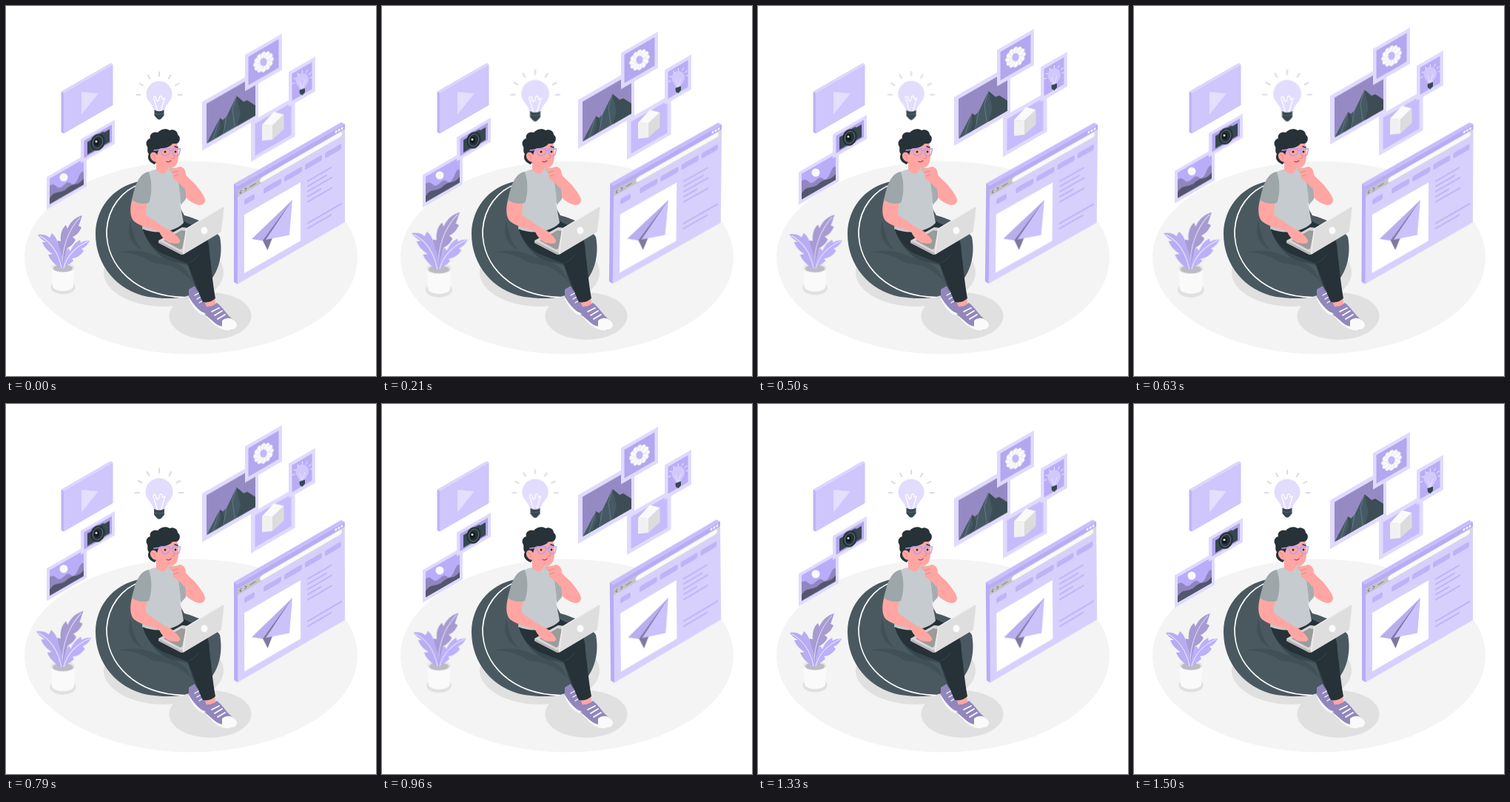
Animation of 500 by 500 pixels, one loop 1.54 s. Source, as an HTML page:

```html
<!DOCTYPE html>
<html lang="en">
<head>
<meta charset="utf-8">
<title>Creative thinking</title>
<style>
html, body { margin: 0; width: 100%; height: 100%; overflow: hidden; background: #fff; }
svg { display: block; width: 100%; height: 100%; }
.float, .wind, .beat { transform-box: fill-box; transform-origin: center; }
.float { animation: float 1540ms linear -35ms infinite; }
.wind { animation: wind 1540ms linear -25ms infinite; }
.beat { animation: beat 1540ms ease-in-out infinite; }
@keyframes float { 50% { transform: translateY(-10px); } }
@keyframes wind { 25% { transform: rotate(1deg); } 75% { transform: rotate(-1deg); } }
@keyframes beat { 0%, 28%, 70%, 100% { transform: scale(1); } 14%, 42% { transform: scale(1.08); } }
.line { fill: none; stroke-linecap: round; stroke-linejoin: round; }
.frame { fill: #e0dafd; }
.skin { fill: #ffa6a3; }
.ink { fill: #263238; }
.slate { fill: #37474f; }
.lilac { fill: #beb3f8; }
.shade { fill: #e0e0e0; }
</style>
</head>
<body>
<svg viewBox="0 0 500 500">
  <ellipse cx="250" cy="340" rx="225" ry="130.500" fill="#f4f4f4"/>
  <ellipse class="shade" cx="213" cy="360" rx="81" ry="46"/>
  <ellipse class="shade" cx="276" cy="419" rx="55.500" ry="32"/>

  <!-- video panel -->
  <path d="M74.500 115.500 141.500 77 144.500 79 78 117.500Z" fill="#dcd5fd"/>
  <path d="M74.500 115.500 78 117.500V172.500L74.500 170.500Z" fill="#bfb4f4"/>
  <path d="M78 117.500 144.500 79V134L78 172.500Z" fill="#cec6fc"/>
  <path d="M102 116 125 118 102 146.500Z" fill="#e4deff"/>

  <!-- left pictures -->
  <g class="float">
    <g transform="matrix(1 -.577 0 1 55 231.5)">
      <path class="frame" d="M0 0H54V44H0Z"/>
      <path d="M4 4.500H50V39H4Z" fill="#b9adfa"/>
      <path d="M4 14Q9 13 13 20T24 24Q29 22 33 28T42 27Q47 17 50 22V39H4Z" fill="#9186bf"/>
      <path d="M4 31Q8 26 14 29T25 32Q31 29 38 32T50 31V39H4Z" fill="#53566c"/>
    </g>
    <circle cx="78" cy="232" r="5.500" fill="#fafafa"/>
    <g transform="matrix(1 -.577 0 1 101 180.5)">
      <path class="frame" d="M0 0H46V32.500H0Z"/>
      <path d="M4.500 4.500H42V28H4.500Z" fill="#b1a5ee"/>
      <path class="slate" d="M9 9H15L17 7H30L32 9H39V26H9Z"/>
    </g>
    <ellipse class="ink" cx="124" cy="184.500" rx="9.500" ry="11.500" transform="rotate(18 124 184.500)"/>
    <ellipse cx="124" cy="184.500" rx="6.500" ry="8.500" transform="rotate(18 124 184.500)" fill="#263238" stroke="#71808a" stroke-width=".8"/>
    <ellipse cx="122.500" cy="184.500" rx="3.400" ry="4.300" fill="#10191e"/>
    <circle cx="122" cy="183.500" r="1.600" fill="#e0e0e0"/>
  </g>

  <!-- right pictures -->
  <g class="float">
    <g transform="matrix(1 -.577 0 1 265 130)">
      <path class="frame" d="M0 0H76V66H0Z"/>
      <path d="M6 6H72V58.500H6Z" fill="#968ac5"/>
    </g>
    <path d="M271 186.500 289 152 293 154.500 298 150 311.500 122 321 130 326 128 337 135V148.500Z" fill="#455a64"/>
    <path d="M289 152 293 154.500 296 171 284 179 290 165ZM311.500 122 321 130 326 128 337 135V148.500L312 163 317 146Z" fill="#3c4d55"/>
    <path class="line" d="M289 152 280 180M298 150 294 172M311.500 122 306 140 309 163" stroke="#77878f" stroke-width=".7"/>

    <g transform="matrix(1 -.577 0 1 331 157)">
      <path class="frame" d="M0 0H59.500V54H0Z"/>
      <path d="M5.500 6H54.500V49H5.500Z" fill="#c6bbfb"/>
    </g>
    <path d="M346 161 362 143.500 375.500 147 360 162Z" fill="#fafafa"/>
    <path d="M346 161 360 162V181L346 182.500Z" fill="#f1f1f1"/>
    <path d="M360 162 375.500 147V167L360 181Z" fill="#dcdcdc"/>

    <g transform="matrix(1 -.577 0 1 323 66.5)">
      <path class="frame" d="M0 0H50V49H0Z"/>
      <path d="M4.500 5H45.500V43.500H4.500Z" fill="#b3a7ef"/>
    </g>
    <g id="flower" fill="#fafafa" stroke="#ddd8e8" stroke-width=".5" transform="translate(348 76) skewY(-18)"></g>
    <ellipse cx="348" cy="76" rx="4.500" ry="5.500" fill="#c3b8f8"/>

    <g transform="matrix(1 -.577 0 1 382 89.5)">
      <path class="frame" d="M0 0H36V47H0Z"/>
      <path d="M4.500 5H31.500V41.500H4.500Z" fill="#b9adf5"/>
    </g>
    <path d="M391.500 102C391 96 395 91 400 91S409 94 409 100C409 105 404 108 404 113L397 115C397 109 392 107 391.500 102Z" fill="#d2c8fc"/>
    <path class="line" d="M397 103 400 113 404 101" stroke="#eee9ff" stroke-width=".8"/>
    <path class="slate" d="M396.500 114 404 111.500V117L400.500 121 397 119Z"/>
    <g id="smallRays" class="line" stroke="#e6e0fe" stroke-width="1.200" transform="translate(400.500 101) skewY(-18)"></g>
  </g>

  <!-- browser -->
  <g class="wind">
    <path d="M308 240.500 453 157 458 159.500 313 243.500Z" fill="#c8bdfa"/>
    <path d="M308 240.500 313 243.500V376L308 373Z" fill="#b8acf5"/>
    <path d="M313 243.500 458 159.500V292L313 376Z" fill="#d8d0fc"/>
    <g transform="matrix(1 -.58 0 1 313 243.5)">
      <path d="M0 0H145V7H0Z" fill="#b8abf5"/>
      <path d="M0 6.500H145V14.500H0Z" fill="#d9d8dc"/>
      <path d="M0 6.500H33V14.500H0Z" fill="#c4c2c9"/>
      <rect x="30" y="7.500" width="111" height="6" rx="3" fill="#fafafa"/>
      <path class="line" d="M5 8.500 3 10.500 5 12.500M10 8.500 12 10.500 10 12.500M17 10.500H24" stroke="#77737f" stroke-width="1"/>
      <g fill="#fff"><circle cx="133" cy="3.500" r="1.500"/><circle cx="137" cy="3.500" r="1.500"/><circle cx="141" cy="3.500" r="1.500"/></g>
      <g class="lilac">
        <rect x="9" y="23.500" width="14" height="7.500" rx="2"/>
        <rect x="35" y="23.500" width="24" height="7.500" rx="2"/>
        <rect x="63" y="23.500" width="24" height="7.500" rx="2"/>
        <rect x="91" y="23.500" width="23" height="7.500" rx="2"/>
        <rect x="118" y="23.500" width="22" height="7.500" rx="2"/>
      </g>
      <path d="M9 44H85V123H9Z" fill="#fff"/>
      <path class="line" d="M95 48H126M95 55H120M95 62H127M95 69H112M95 76H127M95 105H140M95 112H126" stroke="#beb3f8" stroke-width="2.400"/>
    </g>
    <path d="M387 262 332 315 348.500 317.500Z" fill="#b9aeee"/>
    <path d="M387 262 347 317 353.500 330 359 316Z" fill="#81779f"/>
    <path d="M387 262 351 316 383 309.500Z" fill="#cbc1fb"/>
  </g>

  <!-- idea -->
  <g class="beat">
    <g id="rays" class="line" stroke="#dedbdc" stroke-width="2" transform="translate(207 120)"></g>
    <path d="M189.500 119A17.500 17.500 0 0 1 224.500 119C224.500 129 215 132 214 142H200C199 132 189.500 129 189.500 119Z" fill="#e2dcfd"/>
    <path class="line" d="M205 142 200 126C198 121 203 121 203 125S207 130 207 125 211 121 211 125 216 121 214 126L209 142" stroke="#fff" stroke-width="1.300"/>
    <path class="slate" d="M200.500 140.500Q207 144 213.500 140.500V148L210 152Q207 155 204 152L200.500 148Z"/>
    <path class="line" d="M201 145Q207 148 213 145" stroke="#607078" stroke-width=".8"/>
  </g>

  <!-- plant -->
  <g class="beat">
    <ellipse class="shade" cx="77" cy="380" rx="16.500" ry="9.500"/>
    <path d="M61.500 353 63 379C65 387 89 387 91 379L92.500 353Z" fill="#fafafa"/>
    <ellipse cx="77" cy="353.500" rx="15.500" ry="6.500" fill="#e6e6e6"/>
    <ellipse cx="77" cy="354.500" rx="13" ry="5" fill="#bdbac2"/>
    <path d="M75 354C70 342 68 328 70 317L74 318C73 308 76 300 81 296L83 301C87 291 95 285 103 283 101 288 100 293 98 297L102 299C99 306 95 310 90 312L94 316C91 322 87 325 83 327 80 336 78 346 78 354Z" fill="#a79bd2"/>
    <path class="line" d="M76 352C76 325 84 303 100 286" stroke="#e4dfff" stroke-width="1"/>
    <path d="M75 355C67 350 60 344 57 336L63 335C56 331 51 325 49 319L54 319C49 316 45 313 43 309 49 308 55 309 59 313L62 307C68 312 71 320 72 327 76 336 77 346 77 355Z" fill="#b8acf2"/>
    <path class="line" d="M75 354C71 334 61 319 46 311" stroke="#f0edff" stroke-width="1"/>
    <path d="M77 356C77 344 80 334 84 327L87 331C90 324 94 319 100 316L101 320C105 317 109 317 113 317 111 322 107 326 102 328L105 331C101 337 95 341 89 341L91 344C87 349 83 350 80 351L78 356Z" fill="#bcb0fa"/>
    <path class="line" d="M78 354C82 338 94 325 111 318" stroke="#f0edff" stroke-width="1"/>
  </g>

  <!-- beanbag -->
  <path d="M190 236C150 238 121 270 121 308 121 350 150 385 192 393 220 397 246 396 264 383 287 366 294 338 289 312 280 298 260 288 241 283L215 236Z" fill="#4a5960"/>
  <path class="line" d="M183 240C156 249 138 273 136 303 135 352 176 392 240 393.500" stroke="#fff" stroke-width="1.700"/>
  <path d="M154 333C172 328 190 331 206 339 228 344 244 350 251 372 235 352 216 349 198 347 183 337 170 333 154 333ZM168 291C162 310 170 322 184 330 174 318 172 306 168 291Z" fill="#414f56"/>

  <!-- shoes and legs -->
  <path d="M247 383 257 377 268 394 273 407 269 417C260 415 253 403 247 395Z" fill="#9287bc"/>
  <path d="M247 393C253 403 261 413 269 415L268 418C258 416 250 403 247 396Z" fill="#fafafa"/>
  <path class="line" d="M255 391 262 387M258 396 265 392M261 401 268 397" stroke="#fff" stroke-width="1.400"/>
  <path class="skin" d="M266 394 281 390 284 405 272 409Z"/>
  <path d="M269 406C275 407 281 405 285 401 293 407 298 417 306 423 315 429 313 436 304 438 289 439 279 427 270 420Z" fill="#9287bc"/>
  <path d="M292 425C297 421 302 421 306 423 316 429 313 437 303 438 288 440 279 428 270 420V418C278 424 283 431 292 433Z" fill="#fafafa"/>
  <path class="line" d="M278 413 288 408M282 418 292 412M286 423 296 417" stroke="#fff" stroke-width="1.800"/>
  <path class="slate" d="M186 304C191 321 207 342 225 345L246 350C250 365 254 378 259 385L270 380 262 330 235 300Z"/>
  <path class="ink" d="M185 302C189 317 203 333 218 337L245 348C252 362 260 388 266 400Q276 402 283 395C279 373 277 348 275 334 275 318 270 308 262 302L237 289Z"/>
  <path class="line" d="M245 348C253 345 257 341 260 336" stroke="#37474f" stroke-width="1"/>

  <!-- upper body -->
  <path class="skin" d="M232 226 243 229 255 240C261 247 267 255 269 261 270 267 264 271 257 268 249 265 242 259 237 252Z"/>
  <path d="M198 222C184 226 176 238 174 258 184 270 186 286 184 301 202 309 228 306 240 293L235 266 243 261C243 243 239 228 230 219L219 218C212 219 204 220 198 222Z" fill="#c6cbcf"/>
  <path d="M232 231C234 245 236 256 236 269L243 261C244 248 239 232 232 231Z" fill="#a5adb1"/>
  <path class="skin" d="M203 210 203 221C209 229 216 228 219 219L219 208Z"/>
  <path class="skin" d="M171 259C167 272 167 285 173 291 182 298 198 302 209 305 217 313 222 320 230 322 235 321 237 318 234 314 229 307 223 303 215 300L190 283C188 277 190 271 191 265Z"/>
  <path d="M193 224C179 226 174 244 170 262 177 267 186 268 193 266 197 255 198 239 193 224Z" fill="#9da6a9"/>

  <!-- head -->
  <path class="ink" d="M201 214C194 212 190 206 193 200 190 197 192 193 191 190 188 186 190 180 195 179 193 173 200 169 205 171 209 166 217 165 221 168 226 166 232 169 232 174 236 176 236 183 231 186L213 197Z"/>
  <path class="skin" d="M203 190C210 192 219 190 223 186L231 185C234 193 234 205 231 213 226 222 212 220 204 211 199 211 194 206 195 201 197 196 202 197 204 201Z"/>
  <path class="ink" d="M201 194 204 201 207 193C216 192 222 190 225 186L231 186 228 180 203 180Z"/>
  <path class="line" d="M197 201C200 201 202 204 201 207M225 196 228 205 224 206" stroke="#ed8480" stroke-width="1"/>
  <path class="line" d="M211 191 217 190M228 190 232 191" stroke="#263238" stroke-width="1.400"/>
  <path class="line" d="M217 210Q220 212 223 209" stroke="#ad4a50" stroke-width="1.300"/>
  <circle class="ink" cx="215" cy="197" r="1.500"/><circle class="ink" cx="229" cy="197" r="1.400"/>
  <path class="line" d="M200 195 210 194M209 193H221V199Q215 206 210 199ZM225 193H235.500L234 201Q229 205 225.500 199ZM221 195H225" stroke="#b3a0f2" stroke-width="1.400"/>

  <path class="skin" d="M221 222C220 219 223 218 226 220L235 217C241 218 243 223 243 228L250 237 241 247C237 241 232 238 229 235 225 235 225 232 227 230L225 226Z"/>
  <path class="line" d="M225 225 232 223M226 230 233 228" stroke="#ee827e" stroke-width=".9"/>

  <!-- laptop -->
  <path d="M206 317 238 299 247 300 242 334Q239 337 235 335L206 320Z" fill="#d6d6d6"/>
  <path d="M213 317 237 303 243 304 238 328 235 329Z" fill="#9b9b9b"/>
  <path d="M206 317 237 333 242 331 241 335Q238 337 235 335L206 320Z" fill="#b7b7b7"/>
  <path class="skin" d="M207 305C211 300 219 302 225 306 231 311 236 315 235 319 232 323 226 320 221 320 215 317 210 312 207 305Z"/>
  <path d="M246 299 292 271.500Q295 271 294.500 274L291 304Q290 306 288 307L241 335Q238 336 239 332L243 303Q244 300 246 299Z" fill="#dedede"/>
  <path class="line" d="M239.500 334 243.500 303Q244 300 247 299L293 271.500" stroke="#f5f5f5" stroke-width="1"/>
  <ellipse cx="268" cy="303.500" rx="4.500" ry="5" fill="#fafafa"/>
</svg>
<script>
const ring = (id, count, step, shape) => {
  const parts = [];
  for (let i = 0; i < count; i++) parts.push(`<g transform="rotate(${i * step})">${shape}</g>`);
  document.getElementById(id).innerHTML = parts.join("");
};
ring("rays", 7, 30, '<path d="M-25.500 0H-30.500"/>');
ring("smallRays", 7, 30, '<path d="M-10.500 0H-13.500"/>');
ring("flower", 12, 30, '<ellipse cx="8.800" rx="5" ry="3.600"/>');
</script>
</body>
</html>
```
